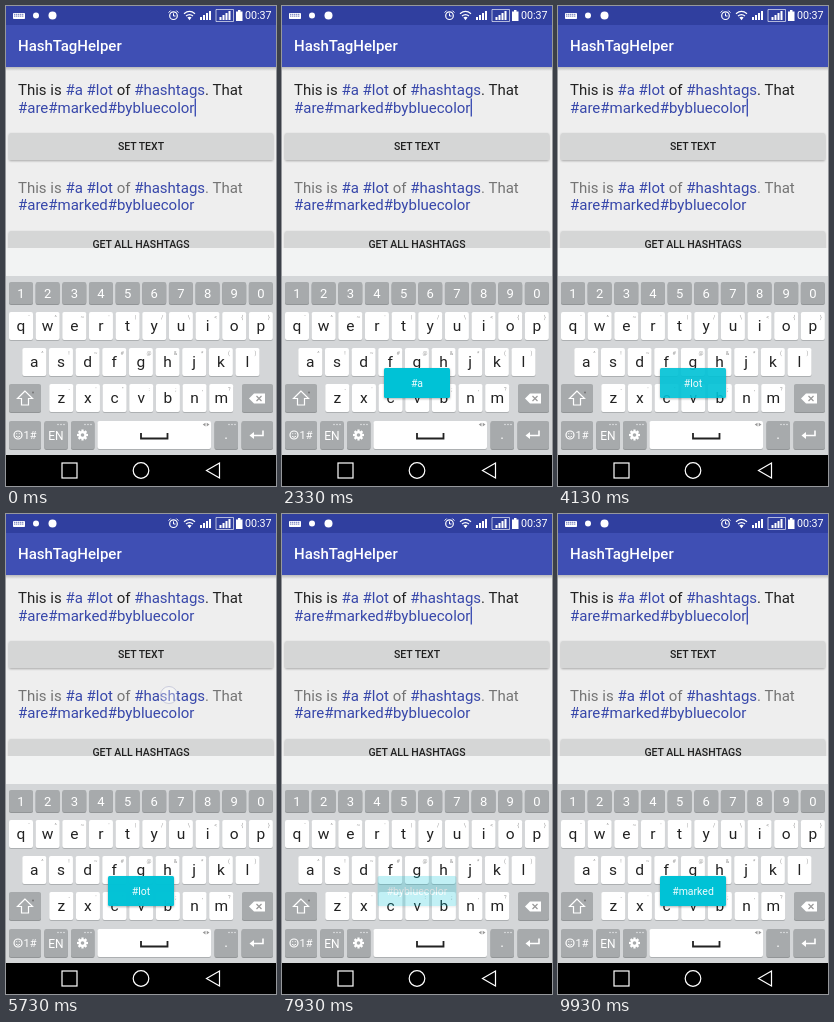
Write an HTML page that moves like this. It is 270 px wide and 480 px high and loops after 9990 ms.

```html
<!DOCTYPE html>
<html lang="en">
<head>
<meta charset="utf-8">
<title>Hashtag demo</title>
<style>
  html, body { margin: 0; width: 100%; height: 100%; overflow: hidden; background: #eee; }
  svg { display: block; width: 100vw; height: 100vh; font-family: Roboto, sans-serif; }
  text { white-space: pre; }
  .mid { text-anchor: middle; }
  .tag { fill: #3747aa; }
  .line { fill: none; stroke: #fff; stroke-width: 1.2; }
</style>
</head>
<body>
<svg viewBox="0 0 270 480">
  <defs>
    <filter id="shadow" x="-20%" y="-20%" width="140%" height="160%">
      <feDropShadow dx="0" dy="1" stdDeviation="1" flood-opacity=".3"/>
    </filter>
    <linearGradient id="fade" x2="0" y2="1">
      <stop stop-opacity=".22"/><stop offset="1" stop-opacity="0"/>
    </linearGradient>
  </defs>
  <rect width="270" height="480" fill="#eee"/>
  <rect y="61" width="270" height="4" fill="url(#fade)"/>
  <rect width="270" height="61" fill="#3f4fb4"/>
  <rect width="270" height="19" fill="#303f9f"/>
  <text x="12" y="45.3" font-size="15" font-weight="500" fill="#fff">HashTagHelper</text>
  <g id="status" fill="#fff"></g>
  <g id="content"></g>
  <rect id="caret" x="188.6" y="92.5" width="1.4" height="18" fill="#3f51b5"/>
  <g id="keyboard"></g>
  <rect y="449" width="270" height="31"/>
  <g class="line">
    <rect x="56" y="457" width="15" height="15"/>
    <circle cx="135" cy="464.5" r="7.8"/>
    <path d="M200.5 464.5L213.5 457V472Z"/>
  </g>
  <g id="toast">
    <rect id="toastBox" y="362" height="30" rx="1.5" fill="#00c2d6" filter="url(#shadow)"/>
    <text id="toastText" class="mid" x="135" y="381" font-size="10.5" fill="#effcfd"></text>
  </g>
  <circle id="touch" r="8.5" fill="#fff" fill-opacity=".65" stroke="#8c92bd" stroke-opacity=".7"/>
</svg>
<script>
const LOOP = 9990;
const $ = id => document.getElementById(id);
const mid = (x, y, size, fill, s, extra = '') =>
  `<text class="mid" x="${x}" y="${y}" font-size="${size}" fill="${fill}" ${extra}>${s}</text>`;
const escape = s => s.replace(/&/g, '&amp;').replace(/</g, '&lt;');

function statusIcons() {
  const signal = x => [0, 1, 2, 3].map(i =>
    `<rect x="${x + i * 3}" y="${11 - i * 2}" width="2" height="${3 + i * 2}"/>`).join('');
  const dots = [0, 1, 2, 3, 4].map(i =>
    `<path d="M${8.2 + i * 2} 8.3h1.1m-1.1 1.8h1.1" stroke="#303f9f" stroke-width=".9"/>`).join('');
  return `<rect x="7" y="7" width="12" height="6" rx=".8"/>${dots}
    <circle cx="30" cy="9.5" r="3"/><circle cx="46.5" cy="9.5" r="4"/>
    <g class="line"><circle cx="167.5" cy="9.7" r="3.8"/>
      <path d="M167.5 7.3V10H169.5M162.6 6.6l2-2M172.4 6.6l-2-2" stroke-width="1"/>
      <path d="M178 7.7q5.5-4.5 11 0M180 10q3.5-2.8 7 0"/>
      <path d="M210 3.5h17.5v12H210z" stroke-width=".8" opacity=".8"/></g>
    <path d="M181.4 11.5q2.1-1.5 4.2 0l-2.1 2.8z"/>
    ${signal(194)}${signal(213.5)}
    <path d="M230 5.5h2V4h2.5v1.5h2V15H230z"/>
    <text x="239" y="13.4" font-size="10.7">00:37</text>`;
}

function paragraph(y, color) {
  const tag = s => `<tspan class="tag">${s}</tspan>`;
  return `<g font-size="15" fill="${color}">
    <text x="12" y="${y}">This is ${tag('#a')} ${tag('#lot')} of ${tag('#hashtags')}. That</text>
    <text x="12" y="${y + 17.5}">${tag('#are#marked#bybluecolor')}</text></g>`;
}

function button(y, label) {
  return `<rect x="3" y="${y}" width="264" height="27" rx="1.5" fill="#d5d6d6" filter="url(#shadow)"/>` +
    mid(135, y + 17.4, 10.5, '#202020', label, 'font-weight="500"');
}

function key(x, y, w, h, dark) {
  return `<rect x="${x}" y="${y + 1}" width="${w}" height="${h}" rx="2" fill="${dark ? '#929597' : '#adb0b2'}"/>
    <rect x="${x}" y="${y}" width="${w}" height="${h}" rx="2" fill="${dark ? '#a7aaac' : '#fff'}"/>`;
}

function letterRow(letters, hints, x, y) {
  return [...letters].map((c, i) => {
    const left = x + i * 26.65;
    return key(left, y, 24, 28) + mid(left + 12, y + 19, 15.5, '#222', c) +
      mid(left + 20, y + 6.5, 5.5, '#999', escape(hints[i]));
  }).join('');
}

function keyboard() {
  const digits = [...'1234567890'].map((c, i) => {
    const left = 3 + i * 26.65;
    return key(left, 276, 24, 22, true) + mid(left + 12, 292, 13, '#fff', c);
  }).join('');
  const more = x => [0, 3, 6].map(d => `<circle cx="${x + d}" cy="418.5" r=".8"/>`).join('');
  const teeth = [0, 45, 90, 135].map(a =>
    `<path d="M76.5 423.5v11" transform="rotate(${a} 76.5 429)" stroke="#fff" stroke-width="2.2"/>`).join('');
  return `<rect y="242" width="270" height="28" fill="#f2f3f3"/>
    <rect y="270" width="270" height="179" fill="#d4d6d8"/>${digits}
    ${letterRow('qwertyuiop', "`^~'|/\\<{}", 3, 306)}
    ${letterRow('asdfghjkl', '^!~#@&*()', 16.3, 342)}
    ${letterRow('zxcvbnm', '-\'":;,?', 43.3, 378)}
    ${key(3, 378, 32, 28, true)}${key(236, 378, 31, 28, true)}
    ${key(3, 415, 32, 28, true)}${key(38.3, 415, 23.5, 28, true)}${key(65, 415, 23.5, 28, true)}
    ${key(91.5, 415, 113.5, 28)}${key(208.5, 415, 23.5, 28, true)}${key(235.5, 415, 31.5, 28, true)}
    <g class="line">
      <path d="M19 385l-7.5 7.5h4v6.5h7v-6.5h4z"/>
      <circle cx="12" cy="429" r="4"/><path d="M10 430.2q2 2.4 4 0M10.7 427.2v1M13.3 427.2v1" stroke-width=".9"/>
    </g>
    <circle cx="27" cy="386.5" r="1" fill="#777"/>
    <path d="M243 392.5l5-5h11v10h-11z" fill="#fff"/>
    <path d="M250.5 390l5 5m0-5l-5 5" stroke="#999" stroke-width="1.2"/>
    ${mid(24, 433, 11, '#fff', '1#')}${mid(50, 433.5, 12, '#fff', 'EN')}${mid(220, 433, 14, '#fff', '.')}
    ${teeth}<circle cx="76.5" cy="429" r="4" fill="#fff"/><circle cx="76.5" cy="429" r="1.8" fill="#a7aaac"/>
    <g fill="#e4e5e6">${more(52)}${more(79)}${more(223)}</g>
    <path d="M135 427v5.5h26.5V427" fill="none" stroke="#222" stroke-width="1.8"/>
    <path d="M199.5 416.8v3.6l-2.8-1.8zM200.7 416.8v3.6l2.8-1.8z" fill="#999"/>
    <path d="M257 424.5v5h-11" fill="none" stroke="#fff" stroke-width="1.6"/>
    <path d="M248 426v7l-4.5-3.5z" fill="#fff"/>`;
}

$('status').innerHTML = statusIcons();
$('content').innerHTML = paragraph(89, '#222') + button(127, 'SET TEXT') +
  paragraph(186.5, '#747474') + button(225, 'GET ALL HASHTAGS');
$('keyboard').innerHTML = keyboard();

// Each tap dismisses the current toast and then brings up its own.
const taps = [
  { at: 1640, x: 67, y: 181, label: '#a', show: 1858 },
  { at: 3430, x: 101, y: 181, label: '#lot', show: 3910 },
  { at: 5570, x: 163, y: 181, label: '#hashtags', show: 6050 },
  { at: 7430, x: 140, y: 199, label: '#bybluecolor', show: 7890 },
  { at: 9060, x: 75, y: 199, label: '#marked', show: 9560 }
];
const FADE_IN = 320, FADE_OUT = 360, HIDE_DELAY = 110;
const clamp = v => Math.max(0, Math.min(1, v));
const setOpacity = (id, v) => $(id).setAttribute('opacity', v);

function drawToast(t) {
  const i = taps.findLastIndex(tap => t >= tap.show);
  if (i < 0) return setOpacity('toast', 0);
  const tap = taps[i], next = taps[i + 1];
  const shown = 1 - (1 - clamp((t - tap.show) / FADE_IN)) ** 2;
  const hidden = next ? clamp((t - next.at - HIDE_DELAY) / FADE_OUT) ** 2 : 0;
  const label = $('toastText');
  label.textContent = tap.label;
  const width = Math.max(66, label.getComputedTextLength() + 18);
  $('toastBox').setAttribute('x', 135 - width / 2);
  $('toastBox').setAttribute('width', width);
  setOpacity('toast', shown * (1 - hidden));
}

function drawTouch(t) {
  const tap = taps.findLast(tap => t >= tap.at);
  if (!tap) return setOpacity('touch', 0);
  const age = t - tap.at;
  $('touch').setAttribute('cx', tap.x);
  $('touch').setAttribute('cy', tap.y);
  setOpacity('touch', clamp(age / 40) * clamp((220 - age) / 110));
}

function draw(t) {
  const beat = t % 1000;
  setOpacity('caret', beat < 400 || beat >= 930 ? 1 : 0);
  drawToast(t);
  drawTouch(t);
}

const start = performance.now();
function tick() {
  draw((performance.now() - start) % LOOP);
  requestAnimationFrame(tick);
}
tick();
</script>
</body>
</html>
```
